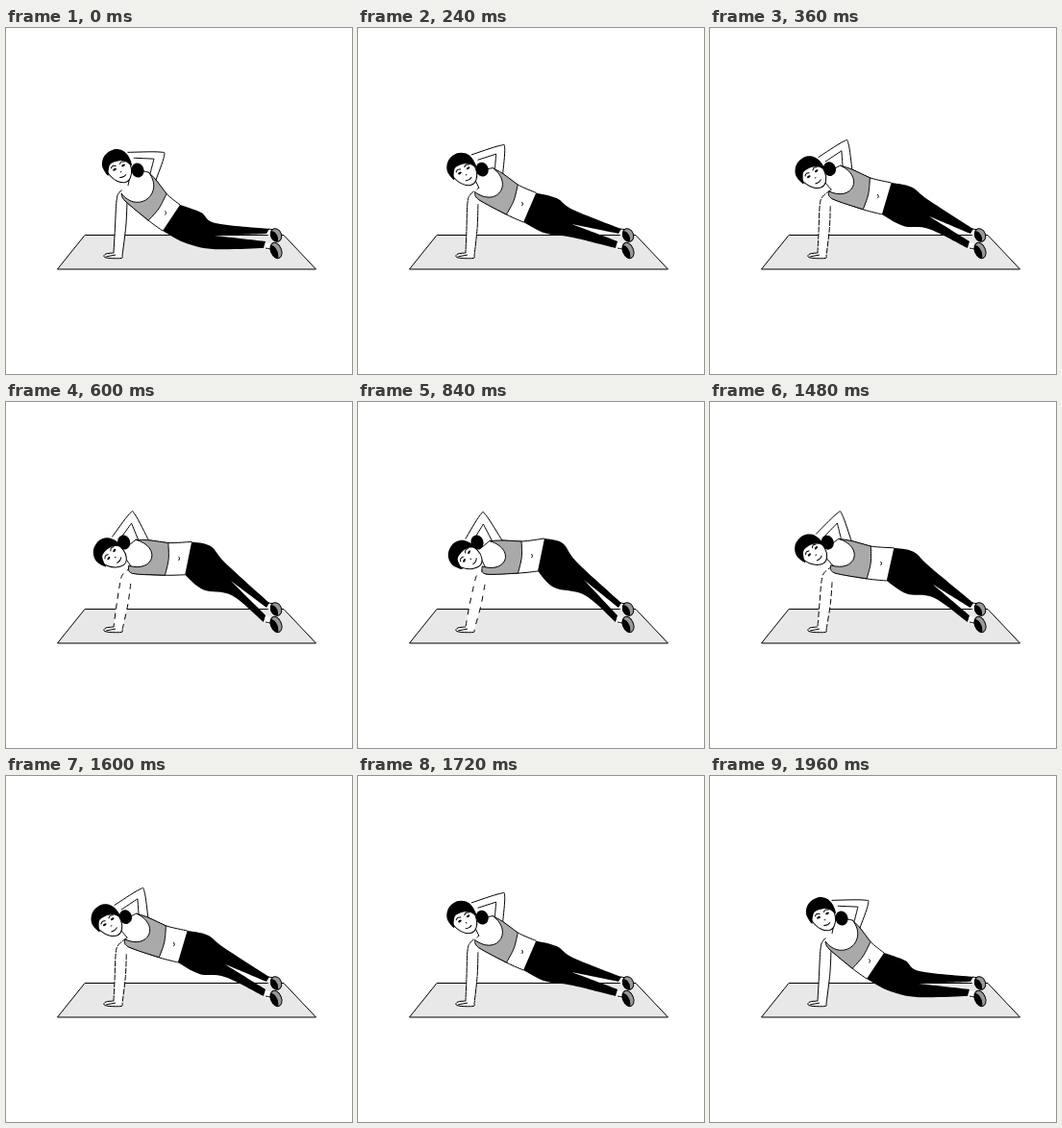
These frames come from a looping animation (360 px wide and 360 px high, 2320 ms). An HTML page with a canvas:

```html
<!DOCTYPE html>
<html lang="en">
<head>
<meta charset="utf-8">
<title>Side plank</title>
<style>
html, body { margin: 0; width: 100%; height: 100%; overflow: hidden; background: #fff; }
canvas { display: block; width: 360px; height: 360px; }
</style>
</head>
<body>
<canvas id="stage" width="360" height="360"></canvas>
<script>
const ctx = document.getElementById('stage').getContext('2d');
const LOOP = 2320, STEP = 120, LOWER_AT = 1240, TOP = 7;
const INK = '#000', SKIN = '#fff', MAT = '#e8e8e8', BRA = '#a9a9a9', SHOE = '#999';

// Each joint travels along a quadratic arc: start, control, end
const arcs = {
  head: [[117, 144], [97, 151], [112, 160]],
  bob: [[137, 148], [117, 146], [124, 146]],
  elbow: [[166, 129], [135, 108], [130, 113]],
  armpit: [[156, 158], [142, 142], [150, 144]],
  chest: [[124, 180], [127, 176], [133, 179]],
  shoulder: [[118, 171], [114, 176], [124, 180]],
  waistTop: [[181, 184], [191, 155], [194, 142]],
  waistLow: [[163, 211], [185, 191], [187, 176]],
  hip: [[203, 192], [212, 157], [213, 147]],
  thigh: [[218, 203], [232, 169], [228, 167]],
  crotch: [[217, 216], [231, 188], [235, 185]],
  seat: [[185, 223], [210, 201], [204, 193]],
  knee: [[215, 230], [233, 200], [236, 201]]
};
const tilts = [-26, -34, -60];

const add = (a, b, k = 1) => [a[0] + b[0] * k, a[1] + b[1] * k];
const sub = (a, b) => add(a, b, -1);
const lerp = (a, b, k) => add(a, sub(b, a), k);
const unit = a => [a[0] / Math.hypot(...a), a[1] / Math.hypot(...a)];
const arc = (a, b, c, u) => (1 - u) ** 2 * a + 2 * u * (1 - u) * b + u * u * c;

function poseAt(u) {
  const p = { u, tilt: arc(...tilts, u) * Math.PI / 180 };
  for (const name in arcs) {
    const [a, b, c] = arcs[name];
    p[name] = [arc(a[0], b[0], c[0], u), arc(a[1], b[1], c[1], u)];
  }
  const c = Math.cos(p.tilt), s = Math.sin(p.tilt);
  p.onHead = (x, y) => add(p.head, [x * c - y * s, x * s + y * c]);
  // the garment edges follow from the torso joints
  p.strapLow = add(p.chest, [-4, -8]);
  p.strapTop = add(p.armpit, sub(p.armpit, p.waistTop), .3);
  p.along = unit(sub(lerp(p.waistTop, p.waistLow, .5), lerp(p.armpit, p.chest, .5)));
  p.bandTop = add(lerp(p.armpit, p.waistTop, .48), [-1, 2]);
  p.bandLow = add(lerp(p.chest, p.waistLow, .62), [0, 1]);
  return p;
}

// Adds a smooth curve through the points to the current path
function curve(p, closed) {
  const n = p.length;
  const at = i => closed ? p[(i + n) % n] : p[Math.max(0, Math.min(n - 1, i))];
  ctx.lineTo(...p[0]);
  for (let i = 0; i < (closed ? n : n - 1); i++) {
    const [a, b, c, d] = [at(i - 1), at(i), at(i + 1), at(i + 2)];
    ctx.bezierCurveTo(...add(b, sub(c, a), 1 / 6), ...add(c, sub(b, d), 1 / 6), ...c);
  }
}

function fill(color, ...runs) {
  ctx.beginPath();
  runs.forEach(r => curve(r));
  ctx.closePath();
  ctx.fillStyle = color;
  ctx.fill();
}

function line(...points) {
  ctx.beginPath();
  curve(points);
  ctx.stroke();
}

function blob(color, points, outline) {
  ctx.beginPath();
  curve(points, true);
  ctx.fillStyle = color;
  ctx.fill();
  if (outline) ctx.stroke();
}

function oval(color, x, y, rx, ry, turn = 0) {
  ctx.beginPath();
  ctx.ellipse(x, y, rx, ry, turn, 0, 2 * Math.PI);
  ctx.fillStyle = color;
  ctx.fill();
}

function drawMat() {
  ctx.beginPath();
  [[82, 215.5], [289, 215.5], [322.5, 251], [53.5, 251]].forEach(p => ctx.lineTo(...p));
  ctx.closePath();
  ctx.fillStyle = MAT;
  ctx.fill();
  ctx.stroke();
}

function drawShoe(x, y, length, turn) {
  ctx.save();
  ctx.translate(x, y);
  ctx.rotate(turn);
  oval(SHOE, 0, 0, 5.5, length);
  ctx.stroke();
  ctx.clip();
  oval(INK, -4, 1, 5, length);
  ctx.restore();
}

function drawFeet() {
  fill(SKIN, [[271, 208], [279, 210], [278, 217], [270, 214]]);
  fill(SKIN, [[267, 223], [277, 225], [276, 232], [267, 229]]);
  line([273, 209], [279, 210]);
  line([270, 229], [275, 230]);
  drawShoe(281, 215.5, 7, -.4);
  drawShoe(281, 231.5, 8.5, -.4);
}

function drawPants(p) {
  fill(INK,
    [p.waistTop, p.hip, p.thigh, [274, 209]],
    [[271, 214], p.crotch],
    [p.crotch, [270, 222]],
    [[268, 229], p.knee, p.seat, p.waistLow]);
}

function drawRaisedArm(p) {
  const hand = p.onHead(15, -9), palm = p.onHead(18, -1);
  const outer = [hand, lerp(p.elbow, hand, .15), lerp(p.elbow, p.armpit, .15), p.armpit];
  const crook = add(p.elbow, unit(sub(lerp(hand, p.armpit, .5), p.elbow)), 14);
  const root = lerp(p.armpit, p.strapTop, .8);
  fill(SKIN, outer, [root, crook, palm]);
  line(...outer);
  line(palm, crook);
  line(crook, root);
}

function drawPropArm(p) {
  const s = p.shoulder, wrist = [112, 234], heel = [121, 237], pit = add(s, [8, 10]);
  const outer = [add(s, [9, -7]), s, add(s, [-3, 9]), add(lerp(s, wrist, .6), [-1, 0]), wrist];
  const inner = [pit, add(lerp(pit, heel, .45), [1, 0]), heel];
  const hand = [wrist, [104, 235], [102, 238], [108, 239.5], [120, 239.5], heel];
  fill(SKIN, outer, hand, [...inner].reverse());
  line(...hand);
  line([104, 238], [114, 236]);
  // the outline breaks up as the body rises
  ctx.setLineDash([6, 6 * p.u ** 2]);
  line(...outer);
  line(...inner);
  ctx.setLineDash([]);
}

function drawTorso(p) {
  fill(SKIN, [p.strapLow, p.chest, p.bandLow, p.waistLow], [p.waistTop, p.bandTop, p.armpit, p.strapTop]);
  line(p.chest, p.bandLow, p.waistLow);
  line(p.waistTop, p.bandTop, p.armpit);
  const navel = lerp(lerp(p.bandTop, p.bandLow, .5), lerp(p.waistTop, p.waistLow, .5), .55);
  line(add(navel, [0, -2]), add(navel, [1, 0]), add(navel, [0, 2]));
}

function drawBra(p) {
  const [x, y] = unit(sub(p.strapTop, p.strapLow)), scoop = [-y * 28, x * 28];
  const bandMid = add(lerp(p.bandLow, p.bandTop, .5), p.along, 2);
  ctx.beginPath();
  curve([p.strapLow, p.chest, p.bandLow]);
  curve([p.bandLow, bandMid, p.bandTop]);
  curve([p.bandTop, p.armpit, p.strapTop]);
  ctx.bezierCurveTo(...add(p.strapTop, scoop), ...add(p.strapLow, scoop), ...p.strapLow);
  ctx.fillStyle = BRA;
  ctx.fill();
  ctx.stroke();
}

function drawNeck(p) {
  fill(SKIN, [p.strapLow, p.onHead(0, 14), p.onHead(12, 6), p.strapTop]);
  line(p.onHead(5, 16), add(p.shoulder, [9, -7]));
  line(p.onHead(13, 9), p.strapTop);
}

function drawHead(p) {
  oval(INK, ...p.bob, 6.5, 7.5, -.3);
  ctx.save();
  ctx.translate(...p.head);
  ctx.rotate(p.tilt);
  blob(SKIN, [[-12, -4], [-12, 5], [-8, 13], [-1, 18], [6, 16], [11, 8], [11, -2], [0, -12]], true);
  blob(INK, [[-14, 4], [-15, -8], [-8, -16.5], [3, -18], [11, -13], [14, -5], [13, 5], [9, -1], [3, -5], [-6, -6], [-11, -1]]);
  for (const side of [-1, 1]) {
    const x = 5 * side;
    line([x - 3, -1.5], [x, -3], [x + 3, -1.5]);
    oval(INK, x, 1.2, 2, 1.1);
  }
  line([-1, 6], [.5, 6.5]);
  line([-4, 11], [0, 12], [3.5, 11]);
  ctx.restore();
}

function draw(u) {
  const p = poseAt(u);
  ctx.fillStyle = '#fff';
  ctx.fillRect(0, 0, 360, 360);
  ctx.strokeStyle = INK;
  ctx.lineWidth = 1;
  ctx.lineJoin = 'round';
  drawMat();
  drawFeet();
  [drawRaisedArm, drawTorso, drawPants, drawPropArm, drawNeck, drawBra, drawHead].forEach(part => part(p));
}

// Up in seven eased steps, hold, down in seven, hold
function liftAt(t) {
  const step = t < LOWER_AT
    ? Math.min(TOP, Math.floor(t / STEP))
    : Math.max(0, TOP - 1 - Math.floor((t - LOWER_AT) / STEP));
  const k = Math.min(1, step / 6.4);
  return k * k * (3 - 2 * k);
}

const start = performance.now();
function tick() {
  draw(liftAt((performance.now() - start) % LOOP));
  requestAnimationFrame(tick);
}
tick();
</script>
</body>
</html>
```
